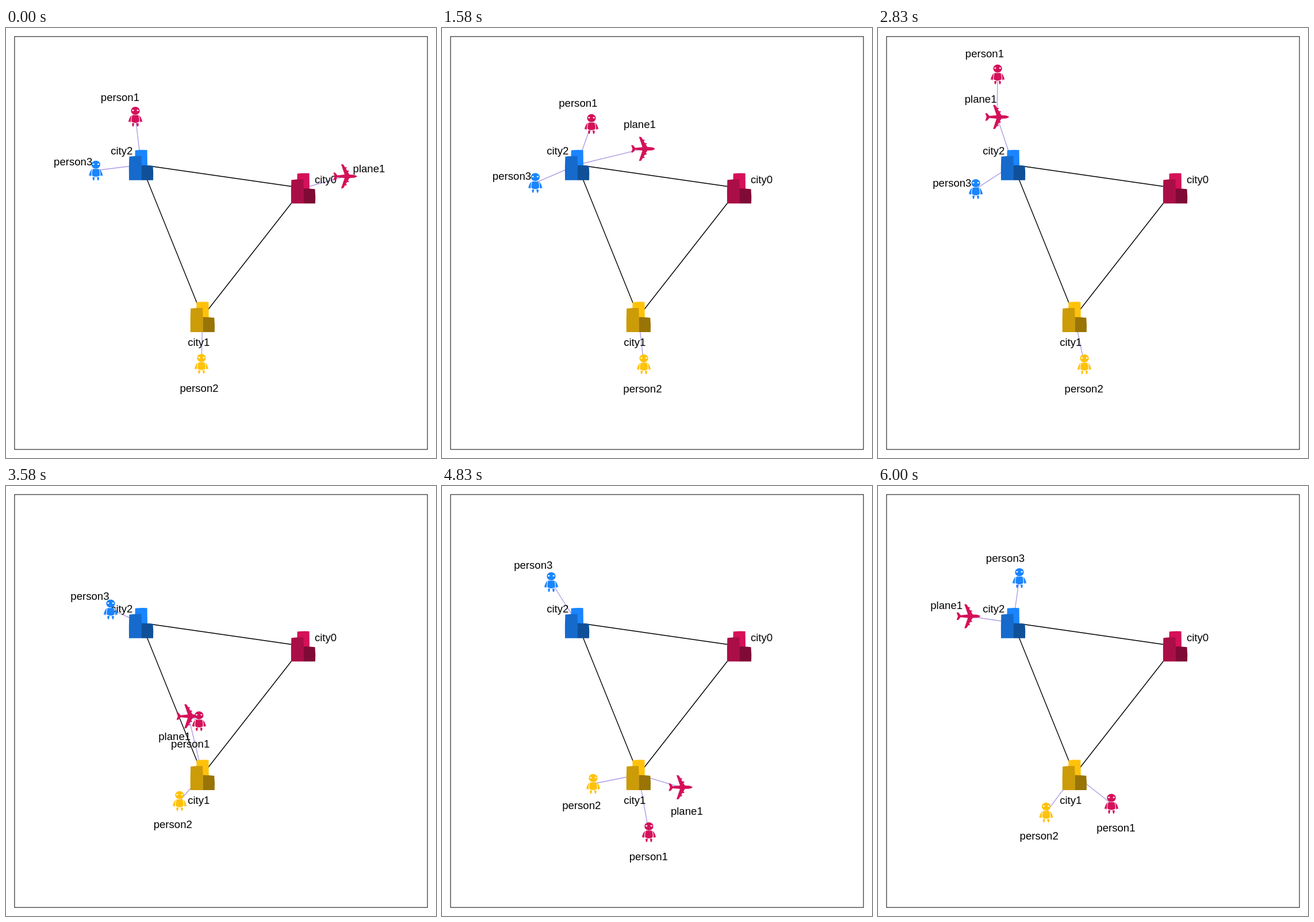
Animation of 748x748 px, one loop 6080 ms. Source, as an HTML page with a canvas:

```html
<!DOCTYPE html>
<html lang="en">
<head>
<meta charset="utf-8">
<title>Travel plan</title>
<style>
  html, body { margin: 0; height: 100%; overflow: hidden; background: #fff; }
  canvas { display: block; }
</style>
</head>
<body>
<canvas id="stage" width="748" height="748"></canvas>
<script>
const ctx = document.getElementById('stage').getContext('2d');
const LOOP = 6080, HOLD = 1000, FRAME = 1000 / 12, FRAMES_PER_MOVE = 12, MOVES = 5;
const CENTER = [367, 329], LABEL_GAP = 43;

// Each city colour comes as back, left and right tower shades.
const cities = [
  { name: 'city0', pos: [517, 278.5], label: [556, 263], shades: ['#d41159', '#aa0e47', '#7f0a35'] },
  { name: 'city1', pos: [341.8, 502.2], label: [335.3, 546], shades: ['#ffc20a', '#cc9b08', '#997406'] },
  { name: 'city2', pos: [235, 238], label: [201.3, 213.5], shades: ['#1a85ff', '#156acc', '#105099'] }
];

// One position and one host per plan state.
const movers = [
  { name: 'plane1', color: '#d41159',
    path: [[590, 258], [178, 176], [213, 150.5], [391.7, 579], [419.7, 513], [157.3, 226.5]],
    hosts: ['city0', 'city2', 'city2', 'city1', 'city1', 'city2'] },
  { name: 'person1', color: '#d41159',
    path: [[225, 154], [285, 176], [192.7, 61.5], [438, 657], [344.3, 591], [406, 552.5]],
    hosts: ['city2', 'city2', 'plane1', 'plane1', 'city1', 'city1'] },
  { name: 'person2', color: '#ffc20a',
    path: [[340, 584], [359, 585.3], [359, 584.7], [261.3, 521.3], [263.3, 517.3], [292.5, 567.7]],
    hosts: Array(6).fill('city1') },
  { name: 'person3', color: '#1a85ff',
    path: [[156.3, 247.7], [166.5, 284.7], [170.8, 279], [190, 168.5], [190, 166.7], [246, 160]],
    hosts: Array(6).fill('city2') }
];

const towers = [
  'M-10.3 -25.3Q0 -26.6 10.6 -25.7L11 4H-11Z',
  'M-20.6 -14.3Q-10 -15.6 .3 -15.2Q1.5 6 1 26.8H-21Q-21.5 6 -20.6 -14.3Z',
  'M1 .8Q10 .6 20.5 1.8Q21.7 14 21 26.8H.8Z'
].map(d => new Path2D(d));

const planeHalf = s => `M21 0Q18.5 ${-2.4 * s} 13 ${-2.8 * s}L7.5 ${-3.1 * s}L4.6 ${-7.8 * s}H6.3V${-10 * s}
  H3.3L1 ${-13.8 * s}H2.6V${-15.8 * s}H-.2L-3 ${-20.3 * s}Q-4.6 ${-21.4 * s} -7 ${-20.8 * s}
  L-1 ${-3 * s}L-13.5 ${-1.7 * s}L-17.5 ${-6.4 * s}H-20.6L-18.3 0Z`;
const plane = new Path2D(planeHalf(1) + planeHalf(-1));

const sideOf = s => `M${6.4 * s} -2.2Q${10.5 * s} 1 ${12.2 * s} 9.5L${10 * s} 8.6L${9 * s} 10.8
  L${7.8 * s} 8Q${8.2 * s} 3 ${6.4 * s} -2.2ZM${1.8 * s} 11.5L${5.8 * s} 11.8Q${5.8 * s} 15 ${4.8 * s} 17.2
  H${3 * s}Z`;
const person = new Path2D('M-5.3 -2.4H5.3Q7.3 3 6.7 9Q4 11 0 11T-6.7 9Q-7.3 3 -5.3 -2.4Z' + sideOf(1) + sideOf(-1));

function ellipse(x, y, rx, ry, color) {
  ctx.fillStyle = color;
  ctx.beginPath();
  ctx.ellipse(x, y, rx, ry, 0, 0, 2 * Math.PI);
  ctx.fill();
}

function line([x1, y1], [x2, y2], color, width) {
  ctx.strokeStyle = color;
  ctx.lineWidth = width;
  ctx.beginPath();
  ctx.moveTo(x1, y1);
  ctx.lineTo(x2, y2);
  ctx.stroke();
}

function at([x, y], paint) {
  ctx.save();
  ctx.translate(x, y);
  paint();
  ctx.restore();
}

function drawCity(city) {
  at(city.pos, () => towers.forEach((tower, i) => {
    ctx.fillStyle = city.shades[i];
    ctx.fill(tower);
  }));
}

function drawMover({ name, color }, pos) {
  at(pos, () => {
    ctx.fillStyle = color;
    if (name === 'plane1') return ctx.fill(plane);
    ctx.fill(person);
    ellipse(0, -10, 7.7, 7, color);
    ellipse(-4.2, -10.8, 1.6, 1.2, '#fff');
    ellipse(4.2, -10.8, 1.6, 1.2, '#fff');
  });
}

function drawLabel(text, [x, y]) {
  ctx.fillStyle = '#000';
  ctx.fillText(text, x, y + 6.5);
}

// Labels sit outward from the middle of the graph.
function labelSpot([x, y]) {
  const dx = x - CENTER[0], dy = y - CENTER[1];
  const k = LABEL_GAP / Math.hypot(dx, dy);
  return [x + dx * k + 0.5, y + dy * k];
}

function draw(time) {
  const raw = Math.floor((time - HOLD + 5) / FRAME);
  const step = Math.min(Math.max(raw, 0), MOVES * FRAMES_PER_MOVE);
  const state = Math.ceil(step / FRAMES_PER_MOVE);
  const from = Math.max(state - 1, 0);
  const u = step / FRAMES_PER_MOVE - from;

  const spots = {};
  for (const c of cities) spots[c.name] = c.pos;
  for (const m of movers) {
    const a = m.path[from], b = m.path[state];
    spots[m.name] = a.map((v, i) => v + (b[i] - v) * u);
  }

  ctx.fillStyle = '#fff';
  ctx.fillRect(0, 0, 748, 748);
  ctx.strokeStyle = '#000';
  ctx.lineWidth = 1;
  ctx.strokeRect(14.9, 14.9, 718.2, 718.2);

  cities.forEach((c, i) => line(c.pos, cities[(i + 1) % 3].pos, '#000', 1.4));
  for (const m of movers) line(spots[m.name], spots[m.hosts[state]], '#ae9ae6', 1.4);

  ctx.font = '18.6px "Liberation Sans", Arial, sans-serif';
  ctx.textAlign = 'center';
  for (const c of cities) drawLabel(c.name, c.label);
  for (const m of movers) drawLabel(m.name, labelSpot(spots[m.name]));

  cities.forEach(drawCity);
  for (const m of movers) drawMover(m, spots[m.name]);
}

const start = performance.now();
function tick() {
  draw((performance.now() - start) % LOOP);
  requestAnimationFrame(tick);
}
tick();
</script>
</body>
</html>
```
